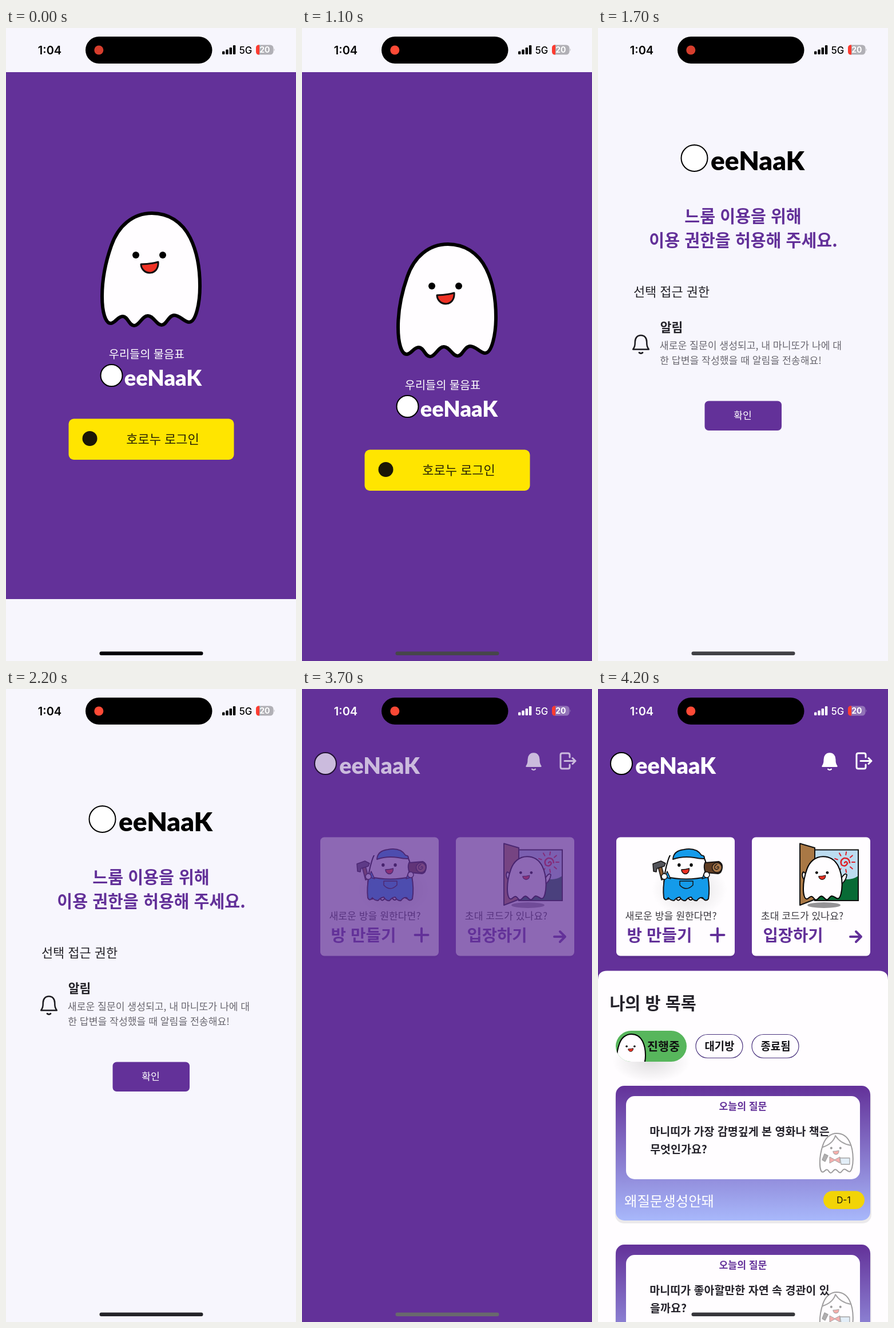
These frames come from a looping animation (507x1104 px, 4.3 s). An HTML page:

```html
<!DOCTYPE html>
<html lang="ko">
<head>
<meta charset="utf-8">
<style>
  html, body { margin: 0; width: 100%; height: 100%; overflow: hidden; background: #f7f6fd; }
  svg { display: block; width: 507px; height: 1104px; }
  text { text-anchor: middle; font-family: "Noto Sans CJK KR", "Noto Sans KR", "Noto Sans CJK", sans-serif; }
  .ui { font-family: Inter, sans-serif; }
  .mark { font-family: Lato, sans-serif; }
  .line { fill: none; stroke-linecap: round; stroke-linejoin: round; }
</style>
</head>
<body>
<svg id="stage" viewBox="0 0 507 1104" lang="ko"></svg>
<script>
const PURPLE = '#633199', PAPER = '#f7f6fd', INK = '#25232b';
const LOOP = 4300;
const RESIZE = 700, HOME_FLASH = 1460, ASK = 1600, HOME = 3500;

const text = (s, cx, cy, size, fill, weight = 400, cls = '') =>
  `<text class="${cls}" x="${cx}" y="${cy + size * 0.37}" font-size="${size}" font-weight="${weight}" fill="${fill}">${s}</text>`;
const rect = (x, y, w, h, r, fill, more = '') =>
  `<rect x="${x}" y="${y}" width="${w}" height="${h}" rx="${r}" fill="${fill}" ${more}/>`;
const circle = (x, y, r, fill, more = '') =>
  `<circle cx="${x}" cy="${y}" r="${r}" fill="${fill}" ${more}/>`;
const shape = (d, fill, stroke = 'none', width = 0, more = '') =>
  `<path d="${d}" fill="${fill}" stroke="${stroke}" stroke-width="${width}" stroke-linejoin="round" ${more}/>`;
const line = (d, stroke, width) =>
  `<path class="line" d="${d}" stroke="${stroke}" stroke-width="${width}"/>`;
const group = (id, body) => `<g id="${id}">${body}</g>`;

const BODY = 'M255 323C222 323 196 345 184 380C172 414 168 440 168 468C168 496 174 515 183 515' +
  'C191 515 195 503 204 503C213 503 215 519 224 519C233 519 238 502 248 502C258 502 263 518 272 518' +
  'C281 518 284 501 294 501C304 501 312 513 320 513C332 513 339 480 339 450' +
  'C339 420 334 390 322 366C308 338 284 323 255 323Z';
const SMILE = 'M236 412Q252 412 266 408C267 420 260 427 251 427C242 427 236 419 236 412Z';
const FACE = circle(227, 396, 6, '#000') + circle(274, 396, 6, '#000') + shape(SMILE, '#ee3124', '#111', 3);

// Ghost fitted into a box; the outline keeps its own width.
function ghost(x, y, w, h, stroke) {
  const m = `translate(${x} ${y}) scale(${w / 177} ${h / 202}) translate(-165.5 -320)`;
  return `<g transform="${m}">` +
    shape(BODY, '#fffdff', '#000', stroke, 'vector-effect="non-scaling-stroke"') + FACE + '</g>';
}

const brand = (dotX, dotY, r, cx, cy, size, fill) =>
  circle(dotX, dotY, r, '#fff', 'stroke="#000" stroke-width="2"') + text('eeNaaK', cx, cy, size, fill, 900, 'mark');

function login() {
  const inner = ghost(165.5, 320, 177, 202, 6) +
    text('우리들의 물음표', 246, 569, 19.7, '#fff', 300) +
    brand(184.5, 606, 19, 274.5, 609.5, 38, '#fff') +
    rect(109.5, 681.5, 289, 71.5, 9, '#ffe500') +
    circle(146.5, 716, 13, '#1b1706') +
    text('호로누 로그인', 274, 717, 22, '#2a2405');
  return rect(0, 0, 507, 1104, 0, PAPER) +
    rect(0, 77, 507, 919, 0, PURPLE, 'id="panel"') + group('loginBody', inner);
}

function bell(cx, top, k, fill, stroke) {
  const d = 'M0 1C-6.5 1-10 6-10 12C-10 19-11 21-13.5 25H13.5C11 21 10 19 10 12C10 6 6.5 1 0 1Z';
  return `<g transform="translate(${cx} ${top}) scale(${k})">` + shape(d, fill, stroke, 2.5) +
    line('M-3 30.5Q0 33 3 30.5', stroke, 2.6) + '</g>';
}

function permission() {
  return rect(0, 0, 507, 1104, 0, PAPER) +
    brand(168.5, 227, 23, 279, 230.5, 46, '#000') +
    text('느룸 이용을 위해', 253.5, 328, 29.2, PURPLE, 600) +
    text('이용 권한을 허용해 주세요.', 254, 370, 29.2, PURPLE, 600) +
    text('선택 접근 권한', 128.5, 460, 21.9, '#222127') +
    text('알림', 128.5, 522, 21.5, '#222127', 600) +
    text('새로운 질문이 생성되고, 내 마니또가 나에 대', 267, 554, 17.2, '#69676f') +
    text('한 답변을 작성했을 때 알림을 전송해요!', 249.5, 580, 17.2, '#69676f') +
    bell(75, 535, 1.02, 'none', '#1c1b20') +
    rect(186.5, 650.5, 134.5, 51.5, 7, PURPLE) +
    text('확인', 253, 676, 17.2, '#fff');
}

function header() {
  return brand(41, 130, 19, 135.5, 133.5, 39.5, '#fff') + bell(405, 111.5, 0.93, '#fff', '#fff') +
    line('M468 119V115Q468 112 465 112H455Q452 112 452 115V136Q452 139 455 139H465Q468 139 468 136V132', '#fff', 3) +
    line('M459 125.5H478M473 120.5L478 125.5L473 130.5', '#fff', 3);
}

function builder() {
  const blue = '#149bea', o = '#151313';
  return '<ellipse cx="160" cy="350" rx="66" ry="48" fill="url(#haze)"/>' +
    `<g clip-path="url(#brim)">${ghost(114, 269, 80, 101, 2)}</g>` +
    shape('M117 327Q154 336 192 327Q196 348 193 366Q188 372 183 364Q177 363 173 369Q167 370 163 363Q158 363 153 369' +
      'Q147 370 143 363Q137 364 133 369Q127 369 123 364Q118 371 115 364Q113 346 117 327Z', blue, o, 2) +
    shape('M117 328L121 318L127 331ZM182 331L187 318L192 328Z', blue, o, 1.5) +
    shape('M143 335H166V342Q160 348 154.5 348Q148 348 143 342Z', blue, o, 1.5) +
    shape('M131 297Q132 282 150 280Q172 276 181 290Q188 291 185 296Q177 296 168 294Q148 291 131 297Z', blue, o, 2) +
    shape('M105 310L111 309L117 331L111 333Z', '#8b5a32', o, 1.5) +
    shape('M96 305L110 300L118 304L116 309L103 313L102 319L97 318Z', '#53545a', o, 1.5) +
    shape('M187 303L211 301Q218 304 217 312Q216 321 210 322L188 320Q184 311 187 303Z', '#5f3c22', o, 2) +
    circle(208, 311.5, 8.5, '#a87749', `stroke="${o}" stroke-width="1.5"`) +
    line('M208 311Q211 308 211 312Q208 317 204 313Q203 307 208 306', o, 1.3) +
    circle(116, 327, 5, '#fff', `stroke="${o}" stroke-width="1.5"`) +
    circle(190, 324, 5, '#fff', `stroke="${o}" stroke-width="1.5"`);
}

function visitor() {
  const rays = Array.from({ length: 9 }, (_, i) => {
    const a = i * Math.PI * 2 / 9, c = Math.cos(a), s = Math.sin(a);
    return `M${431 + 13 * c} ${302 + 13 * s}L${431 + 18 * c} ${302 + 18 * s}`;
  }).join('');
  return rect(379, 280.5, 76, 88.5, 0, '#bcdcf0') +
    shape('M379 334Q400 322 422 329Q440 336 455 326V369H379Z', '#086b35') +
    rect(379, 280.5, 76, 88.5, 0, 'none', 'stroke="#111" stroke-width="2"') +
    shape('M353 269.5L379 277V367L353 377Z', '#a97845', '#111', 2) +
    line('M431 303Q434 299 436 304Q433 311 426 307Q422 299 430 295Q439 294 440 303', '#df2028', 2.5) +
    line(rays, '#df2028', 2) +
    '<ellipse cx="395" cy="377" rx="29" ry="5" fill="#949396"/>' +
    shape('M362 335Q354 325 359 319Q363 320 368 332M424 332Q432 319 435 324Q434 334 425 341', '#fff', '#111', 2) +
    ghost(358, 291, 70, 78, 2);
}

function cards() {
  const card = x => rect(x + 1, 263, 205, 207, 8, '#000', 'opacity=".08"') + rect(x, 258.5, 207, 207, 7, '#fffdff');
  return card(32) + card(269) + builder() + visitor() +
    text('새로운 방을 원한다면?', 127.5, 396, 17.2, '#3c3a40', 300) +
    text('방 만들기', 107.5, 429, 28.8, PURPLE, 600) +
    line('M209 417.5V440.5M197.5 429H220.5', PURPLE, 4) +
    text('초대 코드가 있나요?', 357, 396, 17.2, '#3c3a40', 300) +
    text('입장하기', 341, 429, 28.6, PURPLE, 600) +
    line('M441 432H460M451 423L460 432L451 441', PURPLE, 4);
}

function host() {
  return '<g opacity=".38">' + ghost(387, 774, 60, 71, 2) +
    line('M393 799Q411 793 415 779Q424 793 442 796', '#111', 2) +
    shape('M405 816L414 821L423 816V827L414 822L405 827Z', '#e6332c', '#111', 1) +
    shape('M423 818H440V829H425Z', '#b8d8ee', '#111', 1.3) +
    shape('M396 811L402 814L397 824L392 821Z', '#333', '#111', 1.5) + '</g>';
}

function question(y, first, second, cx2) {
  return `<g transform="translate(0 ${y})">` +
    rect(30, 6, 448, 234, 15, '#000', 'opacity=".08"') +
    rect(31, 0, 445, 235, 15, 'url(#sky)') + rect(49, 18, 409, 145, 15, '#fffdff') +
    text('오늘의 질문', 253.5, 36, 17.2, PURPLE, 600) +
    `<g transform="translate(0 -692)">${host()}</g>` +
    text(first, 247.5, 80, 19.5, INK, 600) + text(second, cx2, 111, 19.5, INK, 600) +
    text('왜질문생성안돼', 124.5, 201, 24.4, '#fff', 300) +
    rect(394, 183.5, 72, 31.5, 15.75, '#f2d406') +
    text('D-1', 429.5, 199, 15.5, '#17150a', 400, 'ui') + '</g>';
}

function sheet() {
  const pill = (x, s) => rect(x, 602.5, 82, 41, 20.5, '#fffdff', 'stroke="#4b347f" stroke-width="1.2"') +
    text(s, x + 41.5, 623, 18.8, '#151419', 600);
  return shape('M0 1104V507Q0 491.5 16 491.5H491Q507 491.5 507 507V1104Z', '#fffdff') +
    text('나의 방 목록', 96, 548, 29.3, INK, 600) +
    '<ellipse cx="93" cy="650" rx="68" ry="36" fill="url(#haze)"/>' +
    rect(31, 596, 124, 54, 27, '#57b65c') +
    `<g clip-path="url(#chip)">${ghost(32, 601, 52, 59, 2)}</g>` +
    text('진행중', 114.5, 623, 20.6, '#111', 600) +
    pill(171, '대기방') + pill(269, '종료됨') +
    question(692, '마니띠가 가장 감명깊게 본 영화나 책은', '무엇인가요?', 141) +
    question(969, '마니띠가 좋아할만한 자연 속 경관이 있', '을까요?', 123);
}

function status() {
  const bars = [5.5, 8.5, 12, 16].map((h, i) => rect(378 + i * 6.3, 46 - h, 4.4, h, 1.3, 'currentColor')).join('');
  return rect(139, 15, 221.5, 47, 23.5, '#000') + circle(162.3, 38.5, 8, '#ff4a36', 'id="rec"') +
    group('clock', text('1:04', 76.5, 38.3, 20, 'currentColor', 600, 'ui')) +
    group('signal', bars + text('5G', 419, 39, 16.7, 'currentColor', 500, 'ui') +
      group('cell', rect(437, 29.5, 30.5, 17, 5.5, 'currentColor') +
        shape('M468.5 35.5Q470.5 38 468.5 40.5Z', 'currentColor')) +
      shape('M443 29.5H442Q437 29.5 437 35V41Q437 46.5 442 46.5H443Z', '#ff3b30') +
      text('20', 452.3, 38.2, 14, '#fff', 700, 'ui')) +
    rect(163.5, 1087.5, 181, 6.5, 3.2, '#000', 'id="bar"');
}

const stage = document.getElementById('stage');
stage.innerHTML = `<defs>
  <linearGradient id="sky" x2="0" y2="1"><stop stop-color="${PURPLE}"/><stop offset="1" stop-color="#a8b8fb"/></linearGradient>
  <radialGradient id="haze"><stop stop-color="#000" stop-opacity=".12"/><stop offset="1" stop-color="#000" stop-opacity="0"/></radialGradient>
  <clipPath id="chip">${rect(31, 596, 124, 54, 27, '#000')}</clipPath>
  <clipPath id="brim">${rect(100, 290, 110, 90, 0, '#000')}</clipPath></defs>` +
  group('login', login()) + group('permission', permission()) +
  group('home', rect(0, 0, 507, 1104, 0, PURPLE) + group('header', header()) +
    group('cards', cards()) + group('sheet', sheet())) +
  status();

const el = Object.fromEntries([...stage.querySelectorAll('[id]')].map(n => [n.id, n]));
const clamp = v => Math.max(0, Math.min(1, v));
const show = (node, on) => { node.style.display = on ? '' : 'none'; };

// Home bar grey level over time: [ms, level]
const GREYS = [[0, 0], [RESIZE, 0], [1100, 70], [1500, 88], [1600, 80], [1900, 36], [3500, 36], [3700, 105], [3850, 105], [4150, 54], [LOOP, 54]];
function grey(t) {
  const i = GREYS.findIndex(k => k[0] > t), [a, u] = GREYS[i - 1], [b, v] = GREYS[i];
  return Math.round(u + (v - u) * (t - a) / (b - a));
}

function draw(t) {
  const flash = t >= HOME_FLASH && t < ASK;
  const home = flash || t >= HOME;
  const age = t - (flash ? HOME_FLASH : HOME);
  show(el.login, t < HOME_FLASH);
  show(el.permission, t >= ASK && t < HOME);
  show(el.home, home);

  const tall = t >= RESIZE;
  el.panel.setAttribute('height', tall ? 1027 : 919);
  el.loginBody.setAttribute('transform', `translate(0 ${tall ? 54 : 0})`);

  [el.header, el.cards, el.sheet].forEach((node, i) => {
    node.setAttribute('opacity', clamp((age - i * 120) / 300));
  });

  const c = home ? Math.round(255 * clamp(age / 150)) : 0;
  el.clock.style.color = `rgb(${c},${c},${c})`;
  el.signal.style.color = home ? '#fff' : '#000';
  el.cell.style.color = home ? '#9273b8' : '#b1b0b6';
  const g = grey(t);
  el.bar.setAttribute('fill', `rgb(${g},${g},${g + 4})`);

  const phase = t % 1700, dim = clamp(1 - Math.min(phase, 1700 - phase) / 350);
  el.rec.setAttribute('opacity', 1 - 0.16 * dim);
}

const start = performance.now();
function tick() {
  draw((performance.now() - start) % LOOP);
  requestAnimationFrame(tick);
}
tick();
</script>
</body>
</html>
```
